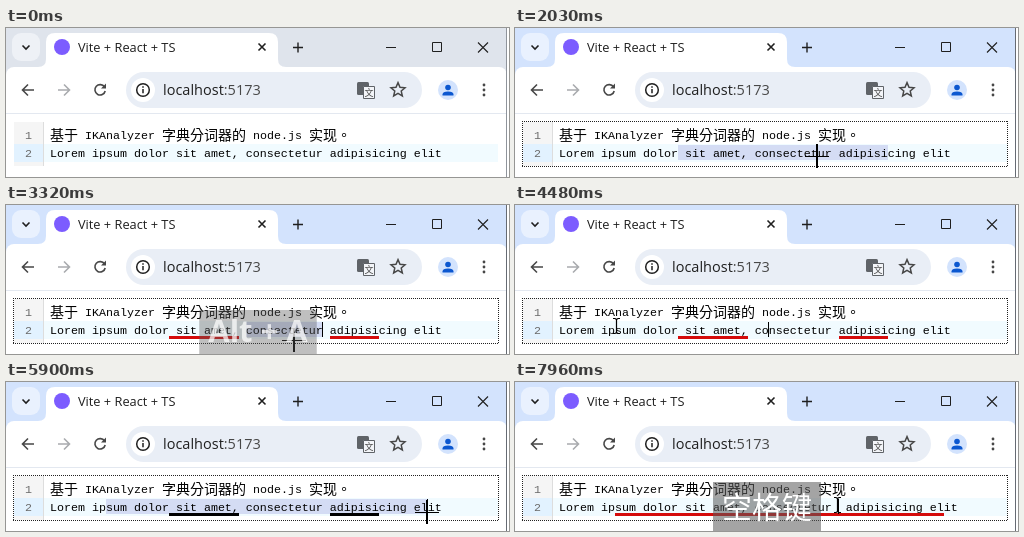
Write an HTML page with a canvas that moves like this. It is 503 px wide and 149 px high and loops after 8000 ms.

```html
<!DOCTYPE html>
<html lang="en">
<head>
<meta charset="utf-8">
<title>Editor underline demo</title>
<style>
html, body { margin: 0; width: 100%; height: 100%; overflow: hidden; background: #fff; }
canvas { display: block; width: 503px; height: 149px; }
</style>
</head>
<body>
<canvas id="stage" width="503" height="149"></canvas>
<script>
const ctx = document.getElementById('stage').getContext('2d');
const LOOP = 8000;
const TEXT_X = 44, CHAR = 7;
const FOCUS = 740, TYPED = 7690;
const FADE_IN = 100, FADE_OUT = 280;
const MONO = '11.667px "Liberation Mono", monospace';
const CJK = '"Noto Sans CJK SC", "Noto Sans CJK", sans-serif';
const CJK_CENTERED = '"Noto Sans CJK TC", ' + CJK;
const UI = '"Open Sans", "Noto Sans", sans-serif';
const INK = '#1f1f1f', ICON = '#474747';

// [time, x, y]
const mousePath = [
  [260, 200, 146], [540, 165, 129], [740, 165, 129], [1220, 374, 128],
  [1620, 374, 128], [1760, 302, 128], [2700, 302, 128], [3030, 288, 135],
  [3860, 288, 135], [4130, 253, 126], [4200, 253, 126], [4480, 101, 121],
  [4610, 92, 124], [4680, 92, 124], [4760, 100, 126], [5250, 450, 128],
  [5420, 421, 130], [6160, 421, 130], [6300, 284, 124], [6630, 281, 122],
  [6900, 281, 122], [7100, 317, 124], [7430, 322, 123]
];
const altHeld = [[2030, 2440], [3250, 3660], [5490, 6160]];
const blinkResets = [740, 1020, 2900, 4160, 4760, 5420, 7100, TYPED];
const keyHints = [
  { label: 'Alt + A', from: 2150, to: 2630 },
  { label: 'Alt + A', from: 3250, to: 3790 },
  { label: 'Alt + A', from: 6020, to: 6560 },
  { label: '空格键', from: TYPED, to: LOOP }
];

const clamp = (v, lo, hi) => Math.min(hi, Math.max(lo, v));
const colX = col => TEXT_X + col * CHAR;

function mouseAt(t) {
  const next = mousePath.findIndex(p => p[0] > t);
  if (next < 0) return mousePath[mousePath.length - 1].slice(1);
  const [t0, x0, y0] = mousePath[next - 1], [t1, x1, y1] = mousePath[next];
  const k = (t - t0) / (t1 - t0), e = k * k * (3 - 2 * k);
  return [x0 + (x1 - x0) * e, y0 + (y1 - y0) * e];
}

// Returns [anchor, head] in columns.
function selectionAt(t) {
  const dragHead = () => clamp(Math.round((mouseAt(t)[0] - TEXT_X) / CHAR), 0, 56);
  if (t < 1220) return [17, dragHead()];
  if (t < 2900) return [17, 47];
  if (t < 4160) return [28, 39];
  if (t < 4760) return [30, 30];
  if (t < 5420) return [8, dragHead()];
  if (t < 7100) return [8, 54];
  return t < TYPED ? [39, 39] : [40, 40];
}

function marksAt(t) {
  if (t < 2170) return [];
  if (t < 3290) return [[17, 47]];
  if (t < 6020) return [[17, 27], [40, 47]];
  return [[8, t < TYPED ? 54 : 55]];
}

function rect(x, y, w, h, color) {
  ctx.fillStyle = color;
  ctx.fillRect(x, y, w, h);
}

function roundBox(x, y, w, h, r, color) {
  ctx.fillStyle = color;
  ctx.beginPath();
  ctx.roundRect(x, y, w, h, r);
  ctx.fill();
}

function disc(x, y, r, color) {
  ctx.fillStyle = color;
  ctx.beginPath();
  ctx.arc(x, y, r, 0, 7);
  ctx.fill();
}

function stroke(d, color, width = 1.6) {
  ctx.strokeStyle = color;
  ctx.lineWidth = width;
  ctx.stroke(new Path2D(d));
}

// Draws text and returns the x where it ends.
function text(str, x, y, font, color, align = 'left') {
  ctx.font = font;
  ctx.fillStyle = color;
  ctx.textAlign = align;
  ctx.fillText(str, x, y);
  return x + ctx.measureText(str).width;
}

function drawTabStrip(active) {
  rect(0, 0, 503, 149, '#fff');
  rect(0, 0, 501, 47, active ? '#d3e3fd' : '#dfe4ec');
  roundBox(0, 39, 501, 20, [8, 8, 0, 0], '#fff');
  roundBox(6, 5, 28, 28, 9, active ? '#e9f1fe' : '#eef1f6');
  stroke('M16.500 17.500l3.500 3.500 3.500-3.500', INK);

  ctx.fillStyle = '#fff';
  ctx.fill(new Path2D('M32 39q8 0 8-8V14q0-9 9-9H263q9 0 9 9V31q0 8 8 8z'));
  disc(56, 19, 8, '#7c5cff');
  text('Vite + React + TS', 72, 23.5, '12.8px ' + UI, INK);
  stroke('M252.500 15.500l7 7M259.500 15.500l-7 7', INK);
  stroke('M287 19.500h10M292 14.500v10', INK, 1.4);

  stroke('M380 19.500h10M426.500 14.500h9v9h-9z', INK, 1);
  stroke('M472 14.500l10 10M482 14.500l-10 10', INK, 1.1);
}

function drawStar(cx, cy) {
  ctx.beginPath();
  for (let i = 0; i < 10; i++) {
    const r = i % 2 ? 3.4 : 7.4, a = i * Math.PI / 5 - Math.PI / 2;
    ctx.lineTo(cx + r * Math.cos(a), cy + r * Math.sin(a));
  }
  ctx.closePath();
  ctx.strokeStyle = ICON;
  ctx.lineWidth = 1.5;
  ctx.stroke();
}

function drawToolbar() {
  stroke('M28 62H17M22 56.500l-5.500 5.500 5.500 5.500', ICON);
  stroke('M52 62H63M58 56.500l5.500 5.500-5.500 5.500', '#a9abae');
  stroke('M98.500 59A5.200 5.200 0 1 0 99.200 63', ICON);
  ctx.fillStyle = ICON;
  ctx.fill(new Path2D('M100 55.500v5h-5z'));

  roundBox(120, 44, 296, 36, 18, '#e9eef6');
  disc(137, 62, 12, '#fff');
  stroke('M143.300 62a6.300 6.300 0 1 0-12.600 0a6.300 6.300 0 1 0 12.600 0M137 61v4.300M137 58.200v1.600', INK, 1.5);
  const hostEnd = text('localhost', 157, 67, '14.5px ' + UI, INK);
  text(':5173', hostEnd, 67, '14.5px ' + UI, ICON);

  roundBox(351, 54, 12, 13, 1.5, '#5f6368');
  roundBox(357, 58, 12, 13, 1.5, '#f3f5f9');
  stroke('M357.500 58.500h11v12h-11z', '#5f6368', 1);
  text('文', 363, 68, '9px ' + CJK, ICON, 'center');
  drawStar(392, 62);

  disc(442, 62, 10, '#d3e3fd');
  disc(442, 59.5, 2.8, '#0b57d0');
  ctx.fill(new Path2D('M436.500 67.500v-1q0-3 5.500-3t5.500 3v1z'));
  for (const y of [57, 62, 67]) disc(478, y, 1.4, ICON);
  rect(0, 85, 500, 1, '#e3e8f0');
}

function drawEditor(t) {
  const focused = t >= FOCUS;
  const [anchor, head] = focused ? selectionAt(t) : [0, 0];
  const from = Math.min(anchor, head), to = Math.max(anchor, head);

  rect(colX(from), 117, (to - from) * CHAR, 15, '#d7d4f0');
  rect(38, 116, 454, 18, 'rgba(204,238,255,.27)');
  rect(8, 94, 29, 44, '#f5f5f5');
  rect(8, 116, 29, 18, '#e2f2ff');
  rect(37, 94, 1, 44, '#ddd');
  text('1', 26, 111, MONO, '#6c6c6c', 'right');
  text('2', 26, 129, MONO, '#6c6c6c', 'right');

  let x = TEXT_X;
  for (const run of '基于| IKAnalyzer |字典分词器的| node.js |实现。'.split('|')) {
    const latin = run.charCodeAt(0) < 128;
    x = text(run, x, latin ? 111 : 112, latin ? MONO : '14px ' + CJK_CENTERED, '#000');
  }
  const gap = t < TYPED ? ' ' : '  ';
  text('Lorem ipsum dolor sit amet, consectetur' + gap + 'adipisicing elit', TEXT_X, 129, MONO, '#000');

  // Selected text takes its underline colour from the selection.
  for (const [a, b] of marksAt(t)) {
    rect(colX(a), 131, (b - a) * CHAR, 3, '#d50b0b');
    const s = Math.max(a, from), e = Math.min(b, to);
    if (e > s) rect(colX(s), 131, (e - s) * CHAR, 3, '#000');
  }

  if (!focused) return;
  ctx.setLineDash([1, 1]);
  stroke('M7 93.500H493M7 138.500H493M7.500 93V139M492.500 93V139', '#212121', 1);
  ctx.setLineDash([]);
  const reset = blinkResets.filter(r => r <= t).pop();
  if ((t - reset) % 1200 < 600) rect(colX(head) - 1, 117, 1, 15, '#000');
}

function drawMouse(t) {
  if (t < 260) return;
  const [x, y] = mouseAt(t).map(Math.round);
  ctx.save();
  ctx.translate(x, y);
  if (altHeld.some(([a, b]) => t >= a && t < b)) {
    rect(-1, -12, 2, 24, '#000');
    rect(-12, 0, 24, 1, '#000');
  } else if (y > 138) {
    const arrow = 'M0 0v16l4-4 2.500 6 2.500-1-2.500-6h5z';
    ctx.fillStyle = '#fff';
    ctx.fill(new Path2D(arrow));
    stroke(arrow, '#000', 1);
  } else {
    stroke('M-3 -7.500H-1L.5 -6.500 2 -7.500H4M.5 -7V7M-3 7.500H-1L.5 6.500 2 7.500H4', '#000', 1.2);
  }
  ctx.restore();
}

function drawKeyHint(t) {
  const hint = keyHints.find(k => t >= k.from && t < k.to + FADE_OUT);
  if (!hint) return;
  const latin = hint.label[0] === 'A';
  const font = latin ? 'bold 31px ' + UI : '30px ' + CJK;
  ctx.font = font;
  const width = ctx.measureText(hint.label).width + 18;
  const top = latin ? 105 : 100;
  ctx.globalAlpha = clamp((t - hint.from) / FADE_IN, 0, 1) * clamp(1 - (t - hint.to) / FADE_OUT, 0, 1);
  rect(252 - width / 2, top, width, 149 - top, 'rgba(90,90,90,.55)');
  text(hint.label, 252, latin ? 137 : 136, font, '#fff', 'center');
  ctx.globalAlpha = 1;
}

function draw(t) {
  const active = t >= FOCUS;
  drawTabStrip(active);
  drawToolbar();
  drawEditor(t);
  drawMouse(t);
  drawKeyHint(t);
  rect(500, 0, 1, 149, active ? '#666b73' : '#8f949b');
}

const start = performance.now();
function frame() {
  draw((performance.now() - start) % LOOP);
  requestAnimationFrame(frame);
}
frame();
</script>
</body>
</html>
```
